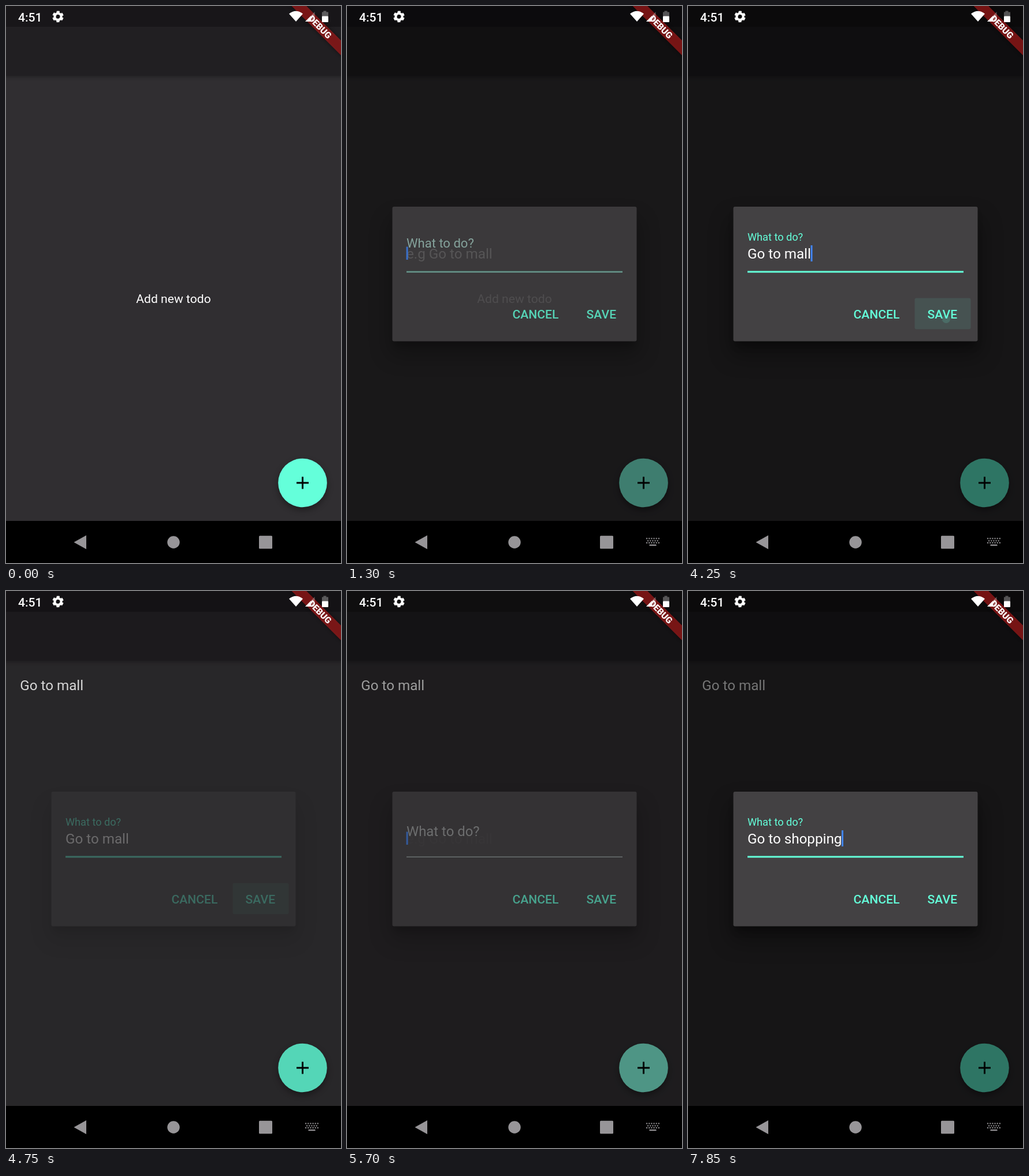
Recreate the animation shown at these times as an HTML page. Size 580 px wide and 966 px high, loop 8000 ms.

```html
<!DOCTYPE html>
<html lang="en">
<head>
<meta charset="utf-8">
<title>Todo</title>
<style>
  html, body { margin: 0; width: 100%; height: 100%; overflow: hidden; background: #000; }
  svg { display: block; width: 100%; height: 100%; font-family: Roboto, sans-serif; }
  .s { font-size: 21.1px; }
  .m { font-size: 24.2px; }
  .btn { font-size: 21.1px; font-weight: 500; fill: #64ffda; }
  .soft { filter: blur(6px); }
  .wide { filter: blur(19px); }
  .thin { filter: blur(3px); }
</style>
</head>
<body>
<svg viewBox="0 0 580 966" preserveAspectRatio="none">
  <defs>
    <clipPath id="fabClip"><circle cx="513.5" cy="827" r="42.3"/></clipPath>
    <clipPath id="saveClip"><rect x="392.5" y="506.500" width="97" height="54" rx="3"/></clipPath>
    <clipPath id="stage"><rect width="580" height="893"/></clipPath>
  </defs>

  <g clip-path="url(#stage)">
    <rect width="580" height="893" fill="#302e31"/>
    <rect class="thin" x="-10" y="40" width="600" height="83" fill="#000" opacity=".3"/>
    <rect width="580" height="121" fill="#211f22"/>
    <rect width="580" height="36" fill="#181619"/>

    <text id="empty" class="s" x="290" y="514.500" text-anchor="middle" fill="#fff">Add new todo</text>
    <text id="item" class="m" x="24.2" y="171.500" fill="#fff">Go to mall</text>

    <circle class="soft" cx="513.5" cy="832" r="42" opacity=".38"/>
    <circle cx="513.5" cy="827" r="42.3" fill="#64ffda"/>
    <circle id="fabInk" cx="516" cy="830" fill="#ccc" clip-path="url(#fabClip)"/>
    <path d="M503 827h21M513.500 816.500v21" stroke="#000" stroke-width="3"/>

    <rect id="barrier" width="580" height="893"/>

    <g id="dialog">
      <rect class="wide" x="72" y="368" width="436" height="240" opacity=".3"/>
      <rect class="soft" x="82" y="358" width="416" height="232" opacity=".25"/>
      <rect x="78.500" y="348" width="423" height="233.500" rx="3" fill="#434143"/>
      <text id="label" class="m" y="8.600">What to do?</text>
      <text id="hint" class="m" x="103" y="437.500" fill="#fff">e.g Go to mall</text>
      <text id="field" class="m" x="103" y="437.500" fill="#fff" xml:space="preserve"></text>
      <rect id="cursor" width="3" fill="#4285f4"/>
      <rect x="103" y="460.500" width="374" height="1.500" fill="#fff" opacity=".5"/>
      <rect id="line" x="103" y="459.500" width="374" height="3" fill="#64ffda"/>
      <g id="saveInk" clip-path="url(#saveClip)" fill="#64ffda">
        <rect x="392" y="506" width="98" height="55" opacity=".09"/>
        <circle id="splash" cx="447" cy="543" opacity=".15"/>
      </g>
      <text class="btn" x="286.500" y="541.500">CANCEL</text>
      <text class="btn" x="414.500" y="541.500">SAVE</text>
    </g>

    <g transform="translate(580 0) rotate(45)">
      <rect class="thin" x="-70" y="42.300" width="140" height="18.100" opacity=".45"/>
      <rect x="-70" y="42.300" width="140" height="18.100" fill="#b71c1c" opacity=".627"/>
      <text y="56.800" text-anchor="middle" fill="#fff" font-size="15.400" font-weight="900">DEBUG</text>
    </g>
  </g>

  <g fill="#fff">
    <text class="s" x="21" y="26.500" font-weight="500">4:51</text>
    <g transform="translate(90 18.400) rotate(12.750)" fill="none" stroke="#fff">
      <circle r="5.600" stroke-width="4.200"/>
      <circle r="8.200" stroke-width="3.200" stroke-dasharray="4.900 3.687"/>
    </g>
    <path d="M502 27L490 13.500Q502 4 514 13.500Z"/>
    <path d="M518 27L534.500 10V27Z" opacity=".3"/>
    <path d="M518 27L528 17V27Z"/>
    <path d="M549.500 8.500h5v2h3.500v7h-11v-7h2.500z" opacity=".3"/>
    <rect x="547" y="17.500" width="11" height="10.500" rx="1"/>
  </g>

  <rect y="893" width="580" height="73"/>
  <g fill="#979598">
    <path d="M117.500 930L139 918V942Z"/>
    <circle cx="290" cy="930" r="10.700"/>
    <rect x="438" y="918.800" width="23" height="22.400" rx="1.500"/>
    <g id="keys" stroke="#979598" stroke-width="2.200" fill="none">
      <path d="M518 923.500h23M520 927.500h19.500M518 931h23" stroke-dasharray="2.200 1.950"/>
      <path d="M523.500 935h12"/>
    </g>
  </g>
</svg>
<script>
  const LOOP = 8000;
  const sessions = [
    { open: 1205, close: 4630, press: 4195, text: 'Go to mall',
      keys: [2080, 2240, 2390, 2540, 2670, 2770, 2830, 2900, 2960, 3020] },
    { open: 5637, close: Infinity, press: Infinity, text: 'Go to shopping',
      keys: [6200, 6330, 6430, 6530, 6600, 6700, 6820, 6950, 7080, 7200, 7450, 7540, 7620, 7700] }
  ];

  const el = {};
  document.querySelectorAll('svg [id]').forEach(n => el[n.id] = n);
  const set = (node, attrs) => { for (const k in attrs) node.setAttribute(k, attrs[k]); };
  const clamp = x => Math.min(1, Math.max(0, x));
  const mix = (a, b, p) => a + (b - a) * p;

  const pen = document.createElement('canvas').getContext('2d');
  function textWidth(s) {
    pen.font = '24.2px Roboto, sans-serif';
    return pen.measureText(s).width;
  }

  // Cubic bezier easing, solved by bisection.
  function bezier(x1, y1, x2, y2) {
    const at = (a, b, u) => 3 * a * u * (1 - u) ** 2 + 3 * b * u * u * (1 - u) + u ** 3;
    return x => {
      if (x <= 0 || x >= 1) return clamp(x);
      let lo = 0, hi = 1;
      for (let i = 0; i < 24; i++) {
        const mid = (lo + hi) / 2;
        if (at(x1, x2, mid) < x) lo = mid; else hi = mid;
      }
      return at(y1, y2, lo);
    };
  }
  const ease = bezier(.25, .1, .25, 1);
  const easeOut = bezier(0, 0, .58, 1);
  const standard = bezier(.4, 0, .2, 1);

  function drawField(s, t) {
    const focus = s.open + 36;
    const typed = s.keys.filter(k => k <= t).length;
    const text = s.text.slice(0, typed);
    const float = standard(clamp((t - focus) / 200));
    const hintFade = 1 - standard(clamp((t - s.keys[0]) / 200));

    const red = mix(255, 100, float), blue = mix(255, 218, float);
    set(el.label, {
      transform: `translate(103 ${mix(417.3, 400.2, float)}) scale(${mix(1, .75, float)})`,
      fill: `rgba(${red},255,${blue},${mix(.5, 1, float)})`
    });
    set(el.hint, { opacity: .5 * float * hintFade });
    set(el.line, { opacity: float });
    el.field.textContent = text;

    const since = t - (typed ? s.keys[typed - 1] : focus);
    set(el.cursor, {
      x: 102.6 + textWidth(text),
      y: typed ? 415 : 417.5,
      height: typed ? 28 : 22.5,
      opacity: since % 1000 < 500 && t < s.close ? 1 : 0
    });
  }

  function drawInk(s, t) {
    const age = t - (s.open - 140);
    set(el.fabInk, {
      r: Math.max(0, age * .38),
      opacity: age < 0 ? 0 : .35 * (1 - clamp((t - s.open) / 220))
    });
    const held = t - s.press;
    const spread = Math.max(0, t - s.close) * .4;
    set(el.splash, { r: held > 0 ? held * .128 + spread : 0 });
    set(el.saveInk, { opacity: clamp(held / 50) * (1 - clamp((t - s.close) / 250)) });
  }

  function render(t) {
    const s = t < 5200 ? sessions[0] : sessions[1];
    const shown = t < s.close ? clamp((t - s.open) / 150) : 1 - clamp((t - s.close) / 150);
    const saved = t >= sessions[0].close;

    set(el.barrier, { opacity: .54 * ease(shown) });
    set(el.dialog, { opacity: easeOut(shown) });
    set(el.empty, { opacity: saved ? 0 : 1 });
    set(el.item, { opacity: saved ? 1 : 0 });
    set(el.keys, { opacity: t > s.open + 45 && t < s.close + 200 ? 1 : 0 });
    drawField(s, t);
    drawInk(s, t);
  }

  let start;
  function tick(now) {
    start ??= now;
    render((now - start) % LOOP);
    requestAnimationFrame(tick);
  }
  render(0);
  requestAnimationFrame(tick);
</script>
</body>
</html>
```
